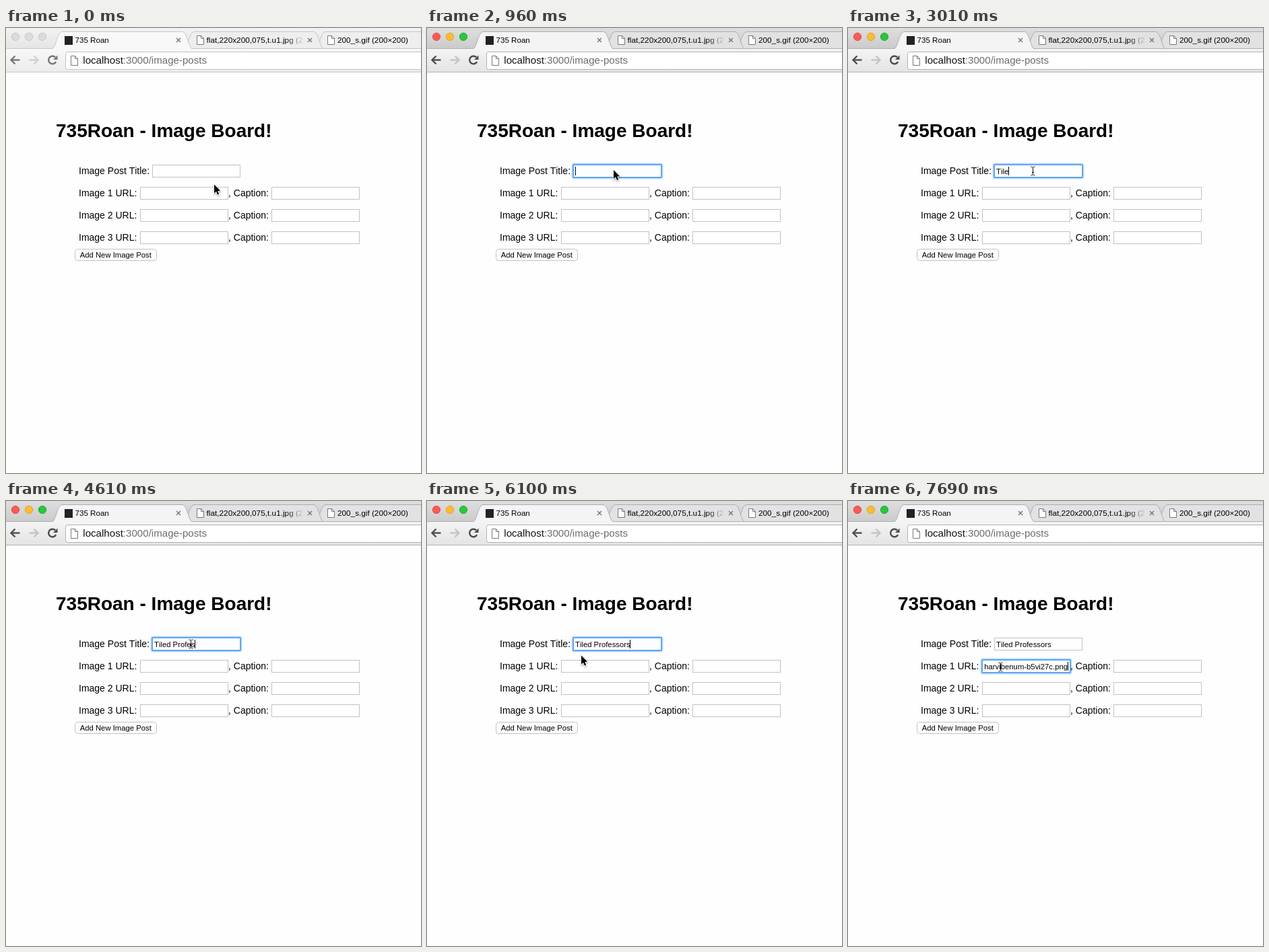
These frames come from a looping animation (616 by 661 pixels, 8 s). An HTML page with a canvas:

```html
<!DOCTYPE html>
<html lang="en">
<head>
<meta charset="utf-8">
<title>Image board form</title>
<style>
  html, body { margin: 0; width: 100%; height: 100%; overflow: hidden; background: #fefefe; }
  canvas { display: block; }
</style>
</head>
<body>
<canvas id="stage" width="616" height="661"></canvas>
<script>
const ctx = document.getElementById('stage').getContext('2d');
const LOOP = 8000, ACTIVATE = 960, FOCUS_URL = 6470, PASTE = 7690;
const TITLE = 'Tiled Professors';
const KEY_TIMES = [2300, 2600, 2740, 3010, 3160, 3310, 3660, 3900,
                   3930, 4080, 4340, 4610, 4780, 4930, 5030, 5130];
const URL_TAIL = 'harvibenum-b5vi27c.png';
const CARET_OFF = [[1430, 1940], [5640, 6090], [6950, 7460]];
const POINTER = [[0, 309, 232.5], [380, 309, 232.5], [670, 277, 211], [1260, 277, 211],
                 [1290, 276, 210], [1430, 274.5, 212.5], [5610, 274.5, 212.5],
                 [5800, 262, 203.5], [6100, 229, 229.5], [6320, 226.5, 246.5]];
const FIELD_W = 131, FIELD_H = 19;

function text(str, x, y, size, color = '#000', weight = '') {
  ctx.font = `${weight} ${size}px "Liberation Sans", Arial, sans-serif`;
  ctx.fillStyle = color;
  ctx.fillText(str, x, y);
  return ctx.measureText(str).width;
}

function vertical(y0, y1, top, bottom) {
  const g = ctx.createLinearGradient(0, y0, 0, y1);
  g.addColorStop(0, top);
  g.addColorStop(1, bottom);
  return g;
}

function shape(points, fill, stroke, width = 1, closed = true) {
  ctx.beginPath();
  for (const [x, y] of points) ctx.lineTo(x, y);
  if (closed) ctx.closePath();
  paint(fill, stroke, width);
}

function paint(fill, stroke, width = 1) {
  if (fill) { ctx.fillStyle = fill; ctx.fill(); }
  if (stroke) { ctx.strokeStyle = stroke; ctx.lineWidth = width; ctx.stroke(); }
}

function roundBox(x, y, w, h, r, fill, stroke, width) {
  ctx.beginPath();
  ctx.roundRect(x, y, w, h, r);
  paint(fill, stroke, width);
}

function tab(left, right, fill, border) {
  ctx.beginPath();
  ctx.moveTo(left, 30.5);
  ctx.bezierCurveTo(left + 5, 29, left + 7, 6, left + 14, 5.5);
  ctx.lineTo(right - 14, 5.5);
  ctx.bezierCurveTo(right - 7, 6, right - 5, 29, right, 30.5);
  paint(fill, border);
}

function pageIcon(x, y, h) {
  const w = 10;
  shape([[x, y], [x + 6, y], [x + w, y + 4], [x + w, y + h], [x, y + h]], '#fff', '#777');
  shape([[x + 6, y], [x + 6, y + 4], [x + w, y + 4]], null, '#777', 1, false);
}

function closeMark(x, y) {
  shape([[x - 3, y - 3], [x + 3, y + 3]], null, '#777', 1.4, false);
  shape([[x + 3, y - 3], [x - 3, y + 3]], null, '#777', 1.4, false);
}

function navArrow(x, dir, color) {
  shape([[x, 47.5], [x + 13 * dir, 47.5]], null, color, 2.4, false);
  shape([[x + 6 * dir, 41.5], [x, 47.5], [x + 6 * dir, 53.5]], null, color, 2.4, false);
}

function drawBrowser(active) {
  const border = active ? '#adadad' : '#c6c6c6';
  const toolTop = active ? '#f4f4f4' : '#f8f8f8';
  const backFill = active ? '#e2e2e2' : '#eeeeee';
  const icon = active ? '#4c4c4c' : '#777';

  ctx.fillStyle = active ? vertical(0, 31, '#dedede', '#cbcbcb') : vertical(0, 31, '#f2f2f2', '#e5e5e5');
  ctx.fillRect(0, 0, 616, 31);
  ctx.fillStyle = vertical(31, 65, toolTop, active ? '#e4e4e4' : '#ececec');
  ctx.fillRect(0, 30, 616, 35);
  ctx.fillStyle = active ? '#b2b2b2' : '#c6c6c6';
  ctx.fillRect(0, 65, 616, 1);

  const lights = active ? ['#fc5b55', '#fdbc2f', '#2cc63e'] : ['#dcdcdc', '#dcdcdc', '#dcdcdc'];
  const rims = active ? ['#e0443e', '#dea123', '#1aab29'] : ['#c6c6c6', '#c6c6c6', '#c6c6c6'];
  lights.forEach((fill, i) => {
    ctx.beginPath();
    ctx.arc(14 + 20 * i, 13, 5.6, 0, 7);
    paint(fill, rims[i]);
  });

  tab(460, 664, backFill, border);
  tab(265, 471, backFill, border);
  shape([[0, 30.5], [616, 30.5]], null, border, 1, false);
  tab(69, 276, toolTop, border);
  ctx.fillStyle = toolTop;
  ctx.fillRect(70, 30, 205, 2);

  ctx.fillStyle = '#222';
  ctx.fillRect(87, 12, 12, 13);
  text('735 Roan', 102.5, 22, 11.6);
  pageIcon(283.5, 11.5, 13);
  const fade = ctx.createLinearGradient(415, 0, 443, 0);
  fade.addColorStop(0, '#000');
  fade.addColorStop(1, 'rgba(0,0,0,0)');
  text('flat,220x200,075,t.u1.jpg (2', 297.5, 22, 11.8, fade);
  pageIcon(477.5, 11.5, 13);
  text('200_s.gif (200×200)', 492, 22, 11.75);
  closeMark(256, 18);
  closeMark(451, 18);

  navArrow(7.5, 1, icon);
  navArrow(47.5, -1, active ? '#c3c3c3' : '#cfcfcf');
  ctx.beginPath();
  ctx.arc(69, 47.5, 5.8, 0.15 * Math.PI, 1.75 * Math.PI);
  paint(null, icon, 2.4);
  shape([[76.5, 40.5], [76.5, 47], [70, 47]], icon);

  roundBox(88.5, 35.5, 540, 26, 3, '#fff', active ? '#b0b0b0' : '#c2c2c2');
  pageIcon(96.5, 41.5, 14);
  const host = text('localhost', 114.3, 53, 15.1, '#111');
  text(':3000/image-posts', 114.3 + host, 53, 15.1, '#6c6c6c');
}

function field(x, y, focused) {
  if (focused) {
    roundBox(x - 1.5, y - 1.5, FIELD_W + 3, FIELD_H + 3, 3, null, 'rgba(100,170,245,.4)', 2);
    roundBox(x, y, FIELD_W, FIELD_H, 1, '#fff', '#5fa5f2', 2);
  } else {
    ctx.fillStyle = '#fff';
    ctx.fillRect(x, y, FIELD_W, FIELD_H);
    ctx.strokeStyle = '#c2c2c2';
    ctx.lineWidth = 1;
    ctx.strokeRect(x + .5, y + .5, FIELD_W - 1, FIELD_H - 1);
  }
}

function caret(t, x, y) {
  if (CARET_OFF.some(([from, to]) => t >= from && t < to)) return;
  ctx.fillStyle = '#000';
  ctx.fillRect(Math.floor(x), y, 1, 13);
}

function drawForm(t) {
  text('735Roan - Image Board!', 74, 162, 28, '#000', 'bold');
  const onTitle = t >= ACTIVATE && t < FOCUS_URL, onUrl = t >= FOCUS_URL;

  text('Image Post Title:', 108, 217, 14);
  field(217, 203, onTitle);
  for (let i = 1; i <= 3; i++) {
    const y = 217 + 33 * i;
    text(`Image ${i} URL:`, 108, y, 14);
    field(199, y - 14, onUrl && i === 1);
    text(', Caption:', 330, y, 14);
    field(394, y - 14, false);
  }

  roundBox(102.5, 328.5, 121, 17, 4, vertical(328, 346, '#fff', '#fafafa'), '#c4c4c4');
  text('Add New Image Post', 109.7, 341, 11.3);

  const typed = TITLE.slice(0, KEY_TIMES.filter(k => t >= k).length);
  const width = text(typed, 220, 217, 11.3);
  if (onTitle) caret(t, 220 + width, 206);

  if (t >= PASTE) {
    ctx.save();
    ctx.beginPath();
    ctx.rect(201, 237, 126, 17);
    ctx.clip();
    ctx.textAlign = 'right';
    text(URL_TAIL, 326, 250, 11.3);
    ctx.restore();
  }
  if (onUrl) caret(t, t >= PASTE ? 326 : 202, 239);
}

function pointerAt(t) {
  const next = POINTER.findIndex(p => p[0] > t);
  if (next < 0) return POINTER[POINTER.length - 1].slice(1);
  const [t0, x0, y0] = POINTER[next - 1], [t1, x1, y1] = POINTER[next];
  const k = (t - t0) / (t1 - t0);
  return [x0 + (x1 - x0) * k, y0 + (y1 - y0) * k];
}

function drawPointer(t) {
  const [x, y] = pointerAt(t);
  const overField = (y >= 203 && y <= 222) || (y >= 236 && y <= 255);
  ctx.save();
  ctx.translate(x, y);
  if (t >= 1290 && overField) {
    for (const s of [-1, 1]) {
      shape([[-3, 6.5 * s], [-1, 6.2 * s], [0, 5 * s], [1, 6.2 * s], [3, 6.5 * s]], null, '#111', 1, false);
    }
    shape([[0, -5.5], [0, 5.5]], null, '#111', 1, false);
    shape([[-1.5, 2], [1.5, 2]], null, '#111', 1, false);
  } else {
    const arrow = [[0, 0], [0, 13], [3, 10.3], [5, 15], [7.2, 14], [5.2, 9.5], [9.2, 9.2]];
    ctx.shadowColor = 'rgba(0,0,0,.35)';
    ctx.shadowBlur = 2;
    ctx.shadowOffsetY = 1;
    shape(arrow, '#fff', '#fff', 2);
    ctx.shadowColor = 'transparent';
    shape(arrow, '#000');
  }
  ctx.restore();
}

function frame(now) {
  const t = now % LOOP;
  ctx.fillStyle = '#fefefe';
  ctx.fillRect(0, 0, 616, 661);
  drawBrowser(t >= ACTIVATE);
  drawForm(t);
  drawPointer(t);
  requestAnimationFrame(next => frame(Math.max(0, next - start)));
}

ctx.fontKerning = 'none';
const start = performance.now();
frame(0);
</script>
</body>
</html>
```
